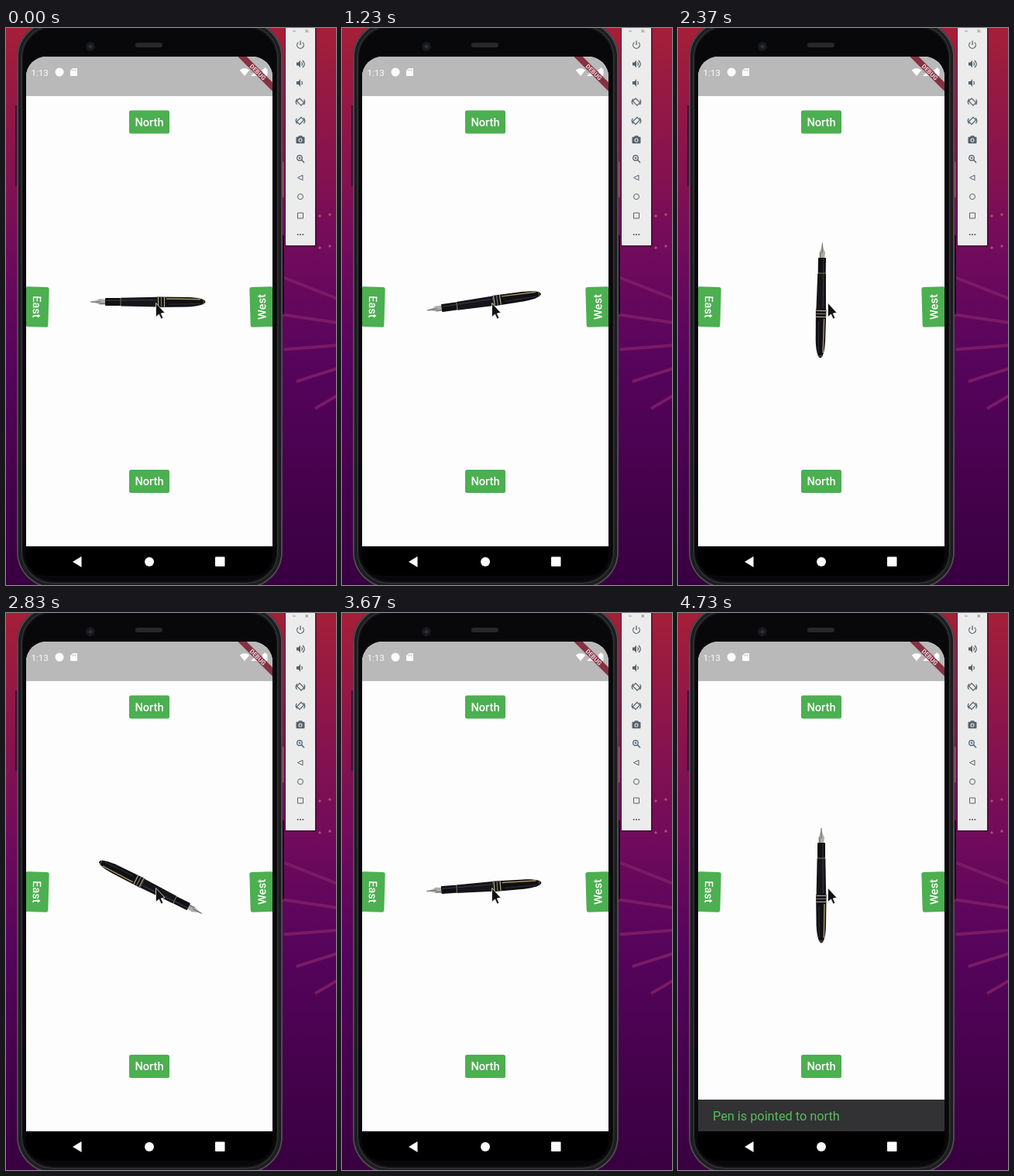
An HTML page with a canvas for the animation above (4.76 s loop, 426 by 720 pixels).

```html
<!DOCTYPE html>
<html lang="en">
<head>
<meta charset="utf-8">
<title>Spinning pen</title>
<style>
  html, body { margin: 0; width: 100%; height: 100%; overflow: hidden; background: #204; }
  canvas { display: block; width: 426px; height: 720px; }
</style>
</head>
<body>
<canvas id="stage" width="426" height="720"></canvas>
<script>
const W = 426, H = 720, LOOP = 4760;
const PAPER = '#fdfdfd', GREEN = '#4caf50', INK = '#56616a', PANEL = '#ececec';
const FONT = 'Roboto, Arial, sans-serif';
const stage = document.getElementById('stage').getContext('2d');
const backdrop = document.createElement('canvas');
backdrop.width = W;
backdrop.height = H;
let c = backdrop.getContext('2d');

const SPIN_START = 195, SPIN_END = 4110, TURNS = 11.25;
const BAR_START = SPIN_END + 10, BAR_TIME = 250, BAR_HEIGHT = 41;

const progress = (t, from, to) => Math.min(1, Math.max(0, (t - from) / (to - from)));

function repeat(count, draw) {
  for (let i = 0; i < count; i++) draw(i);
}

function rect(x, y, w, h, fill, r = 0) {
  c.fillStyle = fill;
  c.beginPath();
  c.roundRect(x, y, w, h, r);
  c.fill();
}

function circle(x, y, r, fill) {
  c.fillStyle = fill;
  c.beginPath();
  c.arc(x, y, r, 0, 7);
  c.fill();
}

function path(points, fill) {
  c.fillStyle = fill;
  c.beginPath();
  points.forEach(([x, y]) => c.lineTo(x, y));
  c.closePath();
  c.fill();
}

function outline(color, width, build) {
  c.strokeStyle = color;
  c.lineWidth = width;
  c.beginPath();
  build();
  c.stroke();
}

function line(x0, y0, x1, y1, color, width) {
  outline(color, width, () => {
    c.moveTo(x0, y0);
    c.lineTo(x1, y1);
  });
}

function label(text, x, y, size, color, weight = 400, align = 'center') {
  c.font = `${weight} ${size}px ${FONT}`;
  c.textAlign = align;
  c.fillStyle = color;
  c.fillText(text, x, y);
}

function at(x, y, angle, draw) {
  c.save();
  c.translate(x, y);
  c.rotate(angle);
  draw();
  c.restore();
}

function drawWallpaper() {
  const sky = c.createLinearGradient(0, 0, 0, H);
  sky.addColorStop(0, '#a51f38');
  sky.addColorStop(0.4, '#710b5c');
  sky.addColorStop(0.6, '#56045c');
  sky.addColorStop(1, '#380040');
  rect(0, 0, W, H, sky);

  // Rays fan out to the left of a hub beyond the right edge.
  repeat(5, i => at(555, 400, (21.5 - 13 * i) * Math.PI / 180, () =>
    line(i * 8 - 213, 0, -100, 0, '#7b1a66', 4)));
  repeat(4, i => circle(405 + 13 * (i % 2), 243 - 2 * (i % 2) + 41 * (i >> 1), 1.7, '#b04a72'));
}

function drawPhone() {
  rect(12, 100, 3, 104, '#3c1030');
  rect(355, 173, 3.5, 46, '#a8565c', 1);
  rect(356, 268, 3, 102, '#170c18');
  rect(14, -9, 343, 733, '#121214', 47);
  // Concentric rims, darker towards the screen
  ['#4c4c50', '#1f1f22', '#2e2e32'].forEach((color, i) => {
    const inset = 1 + i * 2.5;
    outline(color, 2, () =>
      c.roundRect(14 + inset, inset - 9, 343 - 2 * inset, 733 - 2 * inset, 47 - inset));
  });
  rect(22, 0, 327, 715, '#08080a', 39);
  rect(167, 19, 35, 6, '#28282b', 3);
  circle(109, 24, 6, '#18191d');
  circle(109, 24, 2.5, '#2c3034');
}

function drawStatusIcons() {
  label('1:13', 32.5, 61.7, 11.5, PAPER, 400, 'left');
  circle(69, 57, 5.5, PAPER);
  path([[86, 52], [92, 52], [92, 62], [83, 62], [83, 55]], PAPER);
  repeat(3, i => rect(85.3 + 2 * i, 53.5, 0.9, 2.2, '#b9b9b9'));
  c.fillStyle = PAPER;
  c.beginPath();
  c.moveTo(308, 62);
  c.arc(308, 61, 9, -2.35, -0.79);
  c.fill();
  path([[316, 62], [326, 62], [326, 52]], PAPER);
  rect(331, 53, 6.5, 9, PAPER, 1);
  rect(332.8, 51.5, 3, 2, PAPER);
}

function drawButton(text, x, y, angle = 0) {
  at(x, y, angle, () => {
    rect(-26, -15, 52, 30, GREEN, 2.5);
    label(text, 0, 5.3, 14.6, PAPER, 500);
  });
}

function drawScreen() {
  c.save();
  c.beginPath();
  c.roundRect(26, 37, 318, 671, 26);
  c.clip();
  rect(26, 37, 318, 633, PAPER);
  rect(26, 37, 318, 51, '#b9b9b9');
  rect(26, 670, 318, 40, '#000');
  drawStatusIcons();
  at(325, 57, Math.PI / 4, () => {
    rect(-40, -4, 80, 8, '#84323f');
    label('DEBUG', 0, 2.8, 8, '#f2dde0', 700);
  });
  drawButton('North', 185, 121.5);
  drawButton('North', 185, 586);
  drawButton('East', 40, 360.5, 1.6);
  drawButton('West', 330, 360.5, -1.6);
  c.restore();

  path([[86, 690], [97.5, 683], [97.5, 697]], PAPER);
  circle(185, 690, 6, PAPER);
  rect(270, 683.5, 12.5, 12.5, PAPER, 1);
}

const ink = (build, width = 1.2) => outline(INK, width, build);

function drawPower() {
  ink(() => c.arc(0, 0, 4.3, -0.9, 4.04));
  line(0, -5.5, 0, 0, INK, 1.3);
}

function drawSpeaker(waves) {
  rect(-5, -2, 3, 4, INK);
  path([[-4, 0], [0, -5], [0, 5]], INK);
  repeat(waves, i => ink(() => c.arc(0, 0, 2.5 + i * 2.7, -1, 1)));
}

function drawTurn(side) {
  c.scale(side, 1);
  at(0, 0, Math.PI / 4, () => ink(() => c.rect(-4, -2.6, 8, 5.2)));
  ink(() => c.arc(0, 0, 5.6, 2.5, 3.9));
  ink(() => c.arc(0, 0, 5.6, -0.6, 0.7));
}

function drawCamera() {
  rect(-5.5, -3.8, 11, 8.5, INK, 1);
  rect(-2.5, -5.2, 5, 3, INK, 1);
  circle(0, 0.4, 2.5, PANEL);
  circle(0, 0.4, 1.5, INK);
}

function drawZoom() {
  ink(() => c.arc(-1, -1, 3.3, 0, 7));
  line(1.5, 1.5, 5, 5, INK, 1.5);
  line(-2.5, -1, 0.5, -1, INK, 1);
  line(-1, -2.5, -1, 0.5, INK, 1);
}

function drawBack() {
  ink(() => {
    c.moveTo(-3.5, 0);
    c.lineTo(3, -3.3);
    c.lineTo(3, 3.3);
    c.closePath();
  }, 1);
}

function drawToolbar() {
  const tools = [
    drawPower, () => drawSpeaker(2), () => drawSpeaker(1),
    () => drawTurn(1), () => drawTurn(-1), drawCamera, drawZoom, drawBack,
    () => ink(() => c.arc(0, 0, 3.5, 0, 7), 1),
    () => ink(() => c.rect(-3.5, -3.5, 7, 7), 1),
    () => repeat(3, i => circle(3.3 * (i - 1), 0, 1.1, INK))
  ];
  rect(360, 0, 41, 283, 'rgba(30, 0, 30, 0.4)');
  rect(361, 0, 38, 281, PANEL);
  line(370, 4, 374, 4, '#999', 1);
  at(388.3, 3.8, Math.PI / 4, () => {
    line(-2.5, 0, 2.5, 0, '#999', 1);
    line(0, -2.5, 0, 2.5, '#999', 1);
  });
  tools.forEach((draw, i) => at(380, 22 + 24.5 * i, 0, draw));
}

// The pen lies along the x axis, nib to the left.
function drawPen(turns) {
  at(185, 354, turns * 2 * Math.PI, () => {
    c.fillStyle = '#aeadab';
    c.beginPath();
    c.moveTo(-77, 0);
    c.quadraticCurveTo(-68, -1.2, -64, -4);
    c.lineTo(-57, -3.2);
    c.lineTo(-57, 3.4);
    c.lineTo(-64, 3.6);
    c.quadraticCurveTo(-68, 1.2, -77, 0);
    c.fill();
    line(-76, 0, -63, 0, '#55534f', 0.8);
    line(-64, 2.2, -57, 2.4, '#77725f', 1.4);

    rect(-57, -5, 20, 10, '#101014', 1);
    path([[-37, -5.3], [10, -6.2], [10, 6.4], [-37, 5.4]], '#15151a');
    c.fillStyle = '#101014';
    c.beginPath();
    c.moveTo(10, -6.6);
    c.lineTo(50, -6);
    c.bezierCurveTo(80, -5.2, 80, 5, 50, 6.4);
    c.lineTo(10, 6.9);
    c.fill();
    line(-56, -1.8, 8, -2.4, '#3b3b44', 1);
    line(-37, -5, -37, 5, '#85795a', 0.9);
    repeat(3, i => line(11.5 + 4 * i, -6.2, 11.5 + 4 * i, 6.5, i === 1 ? '#77777c' : '#b9a981', 1.2));
    line(22, -4, 66, -3.3, '#a6935a', 1.5);
    line(25, 3.2, 66, 2.6, '#30303a', 1);
    line(70, -3.5, 70, 3.5, '#83775c', 0.8);
  });
}

function drawCursor() {
  path([[193.5, 355.5], [193.5, 373.5], [197.5, 370], [200.3, 376], [202.8, 374.8],
    [200.1, 369], [205, 368]], '#121214');
  c.strokeStyle = '#e8e8e8';
  c.lineWidth = 0.8;
  c.stroke();
}

function drawSnackBar(t) {
  const rise = 1 - (1 - progress(t, BAR_START, BAR_START + BAR_TIME)) ** 3;
  const top = 670 - BAR_HEIGHT * rise;
  c.save();
  c.beginPath();
  c.rect(26, top, 318, 670 - top);
  c.clip();
  rect(26, top, 318, BAR_HEIGHT, '#323234');
  label('Pen is pointed to north', 45, top + 26.5, 16.3, '#55bf59', 400, 'left');
  c.restore();
}

drawWallpaper();
drawPhone();
drawScreen();
drawToolbar();
c = stage;

const start = performance.now();
function frame() {
  const t = (performance.now() - start) % LOOP;
  c.drawImage(backdrop, 0, 0);
  drawPen(TURNS * progress(t, SPIN_START, SPIN_END));
  drawSnackBar(t);
  drawCursor();
  requestAnimationFrame(frame);
}
frame();
</script>
</body>
</html>
```
